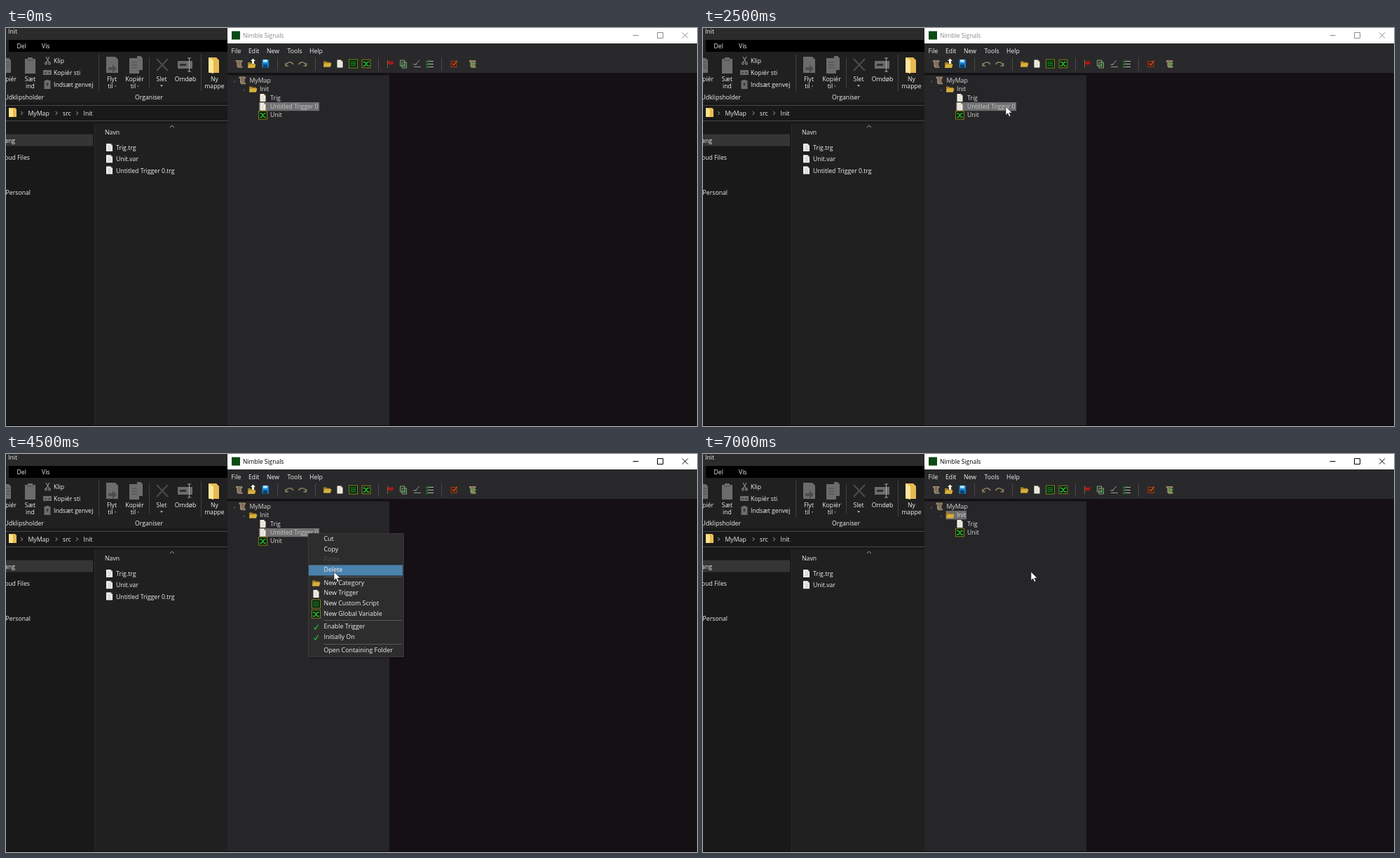
Animation, 986 px wide and 568 px high, one loop 7.2 s. Source, as an HTML page:

```html
<!DOCTYPE html>
<html lang="en">
<head>
<meta charset="utf-8">
<title>Nimble Signals</title>
<style>
html, body { margin: 0; width: 100%; height: 100%; overflow: hidden; background: #141014; }
svg { display: block; width: 100%; height: 100%; }
text { font: 8.7px "Open Sans", "Noto Sans", sans-serif; fill: #f0f0f0; }
.browser text { font-weight: 500; }
.mid text { text-anchor: middle; }
.tree text { fill: #dcdcdc; }
.menu text { font-size: 8.9px; }
.tree .small, .title .small { font-size: 8.5px; }
.title text { fill: currentColor; }
.tree .dim { fill: #c6c6c6; }
.menu .off { fill: #4b4b4d; }
.line { fill: none; stroke: currentColor; }

.title, .gone, .unit, .picked, .menu, .hot, .cursor { animation: 7200ms step-end infinite; }
.title { animation-name: wake; }
.gone { animation-name: remove; }
.unit { animation-name: shift; }
.picked { animation-name: pick; }
.menu { animation-name: popup; }
.cut { animation-name: cut; }
.copy { animation-name: copy; }
.delete { animation-name: delete; }
.cursor { animation-name: move; }

@keyframes wake { 0% { color: #8b8b8b } 37.499% { color: #000 } }
@keyframes remove { 0% { visibility: visible } 69.444% { visibility: hidden } }
@keyframes pick { 0% { visibility: hidden } 69.444% { visibility: visible } }
@keyframes shift { 0% { transform: translateY(12.4px) } 69.444% { transform: none } }
@keyframes popup {
  0% { opacity: 0 } 38.888% { opacity: .6 } 40.277% { opacity: 1 } 68.055%, 100% { opacity: 0 }
}
@keyframes cut { 0%, 47.222% { visibility: hidden } 41.666% { visibility: visible } }
@keyframes copy { 0%, 51.388% { visibility: hidden } 47.222% { visibility: visible } }
@keyframes delete { 0%, 68.055% { visibility: hidden } 54.166% { visibility: visible } }
/* The pointer advances once every 100 ms. */
@keyframes move {
  0% { transform: translate(86px, 580px) }
  5.555% { transform: translate(88px, 566px); animation-timing-function: steps(4) }
  11.111% { transform: translate(99px, 516px); animation-timing-function: steps(3) }
  15.277% { transform: translate(106px, 491px); animation-timing-function: steps(4) }
  20.833% { transform: translate(270px, 325px); animation-timing-function: steps(4) }
  26.388% { transform: translate(404px, 176px); animation-timing-function: steps(4) }
  31.944% { transform: translate(428px, 121px); animation-timing-function: steps(2) }
  34.722% { transform: translate(432px, 112px) }
  40.277% { transform: translate(432px, 112px); animation-timing-function: steps(2) }
  43.055% { transform: translate(446px, 122px) }
  44.444% { transform: translate(446px, 122px); animation-timing-function: steps(3) }
  48.611% { transform: translate(461px, 137px); animation-timing-function: steps(4) }
  54.166% { transform: translate(466px, 159px); animation-timing-function: steps(2) }
  56.944% { transform: translate(467px, 162px) }
  58.333% { transform: translate(467px, 162px); animation-timing-function: steps(3) }
  62.499%, 100% { transform: translate(468px, 168px) }
}
</style>
</head>
<body>
<svg viewBox="0 0 986 568">
  <defs>
    <g id="page">
      <path d="M-4-5.5H1.5L4-3V5.5H-4Z" fill="#f3efe2"/>
      <path d="M1.5-5.5V-3H4Z" fill="#a9a08c"/>
      <path d="M-2-2H1M-2 .5H2M-2 3H2" stroke="#c9c3b2" stroke-width=".7"/>
    </g>
    <g id="file">
      <path d="M-4.5-5.5H2L4.5-3V5.5H-4.5Z" fill="#f4f4f4"/>
      <path d="M2-5.5V-3H4.5Z" fill="#9a9a9a"/>
      <path d="M-2.5-2.5H1M-2.5-.5H3M-2.5 1.5H3M-2.5 3.5H3" stroke="#b5b5b5" stroke-width=".7"/>
    </g>
    <g id="folder">
      <path d="M-5.5-4H-1.5L-.5-2.8H4.5V4H-5.5Z" fill="#a5801f"/>
      <path d="M-5.5 4L-4-1.2H6L4.5 4Z" fill="#d6b040"/>
    </g>
    <g id="script">
      <rect x="-6" y="-6" width="12" height="12" fill="#07200a" stroke="#78851c"/>
      <path d="M-4-2.7H4M-4 0H4M-4 2.7H4" stroke="#25a83a" stroke-width="1.3" stroke-dasharray="2 .8"/>
    </g>
    <g id="var">
      <rect x="-6" y="-5.7" width="12" height="11.4" fill="#061a08" stroke="#8a7d1c"/>
      <path d="M-4.5-2.5H-2L2 3H4.5M-4.5 3H-2L2-2.5H4.5" fill="none" stroke="#2dc043" stroke-width="1.3"/>
    </g>
    <g id="scroll">
      <path d="M-5-5H3.5L5-3.5L3-2V3L5 4.5L4 5.7H-2L-3.5 3.5V-2.5H-5Z" fill="#9d8b72"/>
      <path d="M-2.5-3H2M-2-1H2M-2 1H2M-1 3.5H3" stroke="#4c4033" stroke-width=".8"/>
    </g>
    <path id="check" class="line" d="M-3 .5L-1 3L3-3.5" color="#20b52c" stroke-width="1.4"/>
    <path id="chev" class="line" d="M-1.2-2.4L1.2 0L-1.2 2.4" color="#c8c8c8" stroke-width=".9"/>
    <path id="undo" class="line" d="M-5-1V3H-1M-5 3C-3-3 3-4 6 1" color="#8d8263" stroke-width="1.5"/>
    <path id="caret" d="M-2-1H2L0 1.3Z" fill="#d0d0d0"/>
  </defs>

  <g class="browser">
    <rect width="316" height="568" fill="#202020"/>
    <rect width="316" height="17" fill="#2b2b2b"/>
    <rect x="4" y="17" width="312" height="17" fill="#000"/>
    <rect y="106" width="316" height="30" fill="#191919"/>
    <rect x="-1" y="110.5" width="318" height="22" fill="#191919" stroke="#484848"/>
    <rect y="136" width="126" height="432" fill="#191919"/>
    <path d="M126.5 138V568" stroke="#2c2c2c"/>
    <rect y="151.5" width="124" height="17" fill="#353535"/>
    <path d="M132.5 38V90M204.5 42V85M278.5 38V90" stroke="#414141"/>
    <text x="3" y="8">Init</text>
    <text x="15.5" y="29">Del</text>
    <text x="51" y="29">Vis</text>
    <text x="68" y="49.5">Klip</text>
    <text x="68" y="66.6">Kopiér sti</text>
    <text x="68" y="83.6">Indsæt genvej</text>
    <g text-anchor="end">
      <text x="15" y="76">Kopiér</text>
      <text x="54" y="101.5">Udklipsholder</text>
      <text x="13" y="163.5">Adgang</text>
      <text x="34" y="188">Cloud Files</text>
      <text x="35" y="237.5">Personal</text>
    </g>
    <g class="mid">
      <text x="34.5" y="76">Sæt</text><text x="34.5" y="86">ind</text>
      <text x="151" y="76">Flyt</text><text x="149" y="86">til</text>
      <text x="183.5" y="76">Kopiér</text><text x="181.5" y="86">til</text>
      <text x="222" y="76">Slet</text>
      <text x="256" y="76">Omdøb</text>
      <text x="297.5" y="76">Ny</text><text x="297.5" y="86">mappe</text>
      <text x="204" y="101.5">Organiser</text>
    </g>
    <use href="#caret" x="222" y="82.5"/>
    <use href="#caret" transform="translate(156 83)scale(.6)"/>
    <use href="#caret" transform="translate(188.5 83)scale(.6)"/>
    <g fill="#6c6c6c">
      <path d="M0 43H4L7 46V64H0Z"/>
      <path d="M27 44H31V42H38V44H42V65H27Z"/>
      <path d="M143 41H156L160 45V64H143Z"/>
      <path d="M176 43H187V40H192L195 43V60H190V65H176Z"/>
      <rect x="245" y="47" width="21" height="11"/>
      <rect x="53" y="60" width="12" height="7"/>
      <path d="M54.5 75H57V74H61V75H63.5V87H54.5Z"/>
    </g>
    <g class="line" color="#a8a8a8">
      <path d="M30 46H39M0 49H5M0 53H5M0 57H5" color="#4a4a4a"/>
      <path d="M57 41L61.5 49M62 41L57.5 49"/>
      <circle cx="57" cy="50.5" r="1.5"/><circle cx="62" cy="50.5" r="1.5"/>
      <path d="M259 43H264M261.5 43V62M259 62H264"/>
      <path d="M55 64H58M60 64H63M57 80H61M59 78V83" stroke="#292929"/>
      <path d="M248 52.5H257" stroke="#303030" stroke-width="3"/>
    </g>
    <path d="M146 60H152V64L158 58L152 52V56H146Z" fill="#4d4d4d"/>
    <path d="M179 49H187M179 53H187M179 57H187" stroke="#4d4d4d"/>
    <path d="M215 44L231 61M231 44L215 61" stroke="#4c4c4c" stroke-width="2"/>
    <path d="M289 42H300L304 46V64H289Z" fill="#e7b952"/>
    <path d="M289 42L296 46V65L289 63Z" fill="#ffe79b"/>
    <path d="M4 114H13L15 116V127H4Z" fill="#e7b952"/>
    <path d="M4 114L10 116V127H4Z" fill="#ffe08a"/>
    <use href="#chev" x="22.5" y="121.5"/>
    <use href="#chev" x="72" y="121.5"/>
    <use href="#chev" x="101.5" y="121.5"/>
    <text x="31.5" y="124.6">MyMap</text>
    <text x="81" y="124.6">src</text>
    <text x="110.5" y="124.6">Init</text>
    <path class="line" d="M234 142L237 139L240 142" color="#999"/>
    <text x="141" y="151.5">Navn</text>
    <use href="#file" x="147.5" y="170.5"/><text x="157" y="174">Trig.trg</text>
    <use href="#file" x="147.5" y="186.8"/><text x="157" y="190.2">Unit.var</text>
    <g class="gone">
      <use href="#file" x="147.5" y="203"/><text x="157" y="206.5">Untitled Trigger 0.trg</text>
    </g>
  </g>

  <!-- editor window -->
  <rect x="316" width="670" height="568" fill="#141014"/>
  <rect x="316" y="22" width="670" height="42" fill="#29292b"/>
  <rect x="316" width="670" height="22" fill="#fff"/>
  <rect x="316" y="67.5" width="231" height="501" fill="#262628"/>
  <rect x="322" y="4.5" width="12" height="12" fill="#0b4a15"/>
  <g class="title">
    <text class="small" x="338" y="13.7">Nimble Signals</text>
    <path class="line" d="M894.5 10.5H902.5M929.5 6.5H937.5V14.5H929.5ZM965 6.5L973 14.5M973 6.5L965 14.5"/>
  </g>
  <text x="321.5" y="35.6">File</text>
  <text x="346" y="35.6">Edit</text>
  <text x="372" y="35.6">New</text>
  <text x="401.5" y="35.6">Tools</text>
  <text x="433" y="35.6">Help</text>

  <path d="M387.5 42V61M441.5 42V61M531.5 42V61M621.5 42V61" stroke="#49494b"/>
  <use href="#scroll" x="333" y="51"/>
  <use href="#folder" x="350.5" y="53"/>
  <path d="M351 51V47H349L352.5 43.5L356 47H354V51Z" fill="#f2f2e8"/>
  <rect x="365.5" y="45" width="9.5" height="11.5" fill="#1683d2"/>
  <path d="M367 45H373V49H367Z" fill="#a8dcff"/>
  <path d="M367 52H373V56.5H367Z" fill="#0a416e"/>
  <use href="#undo" x="404" y="51"/>
  <use href="#undo" transform="translate(423.5 51)scale(-1 1)"/>
  <use href="#folder" x="458.5" y="51.5"/>
  <use href="#page" x="476.5" y="51"/>
  <use href="#script" x="495.5" y="51"/>
  <use href="#var" x="514" y="51"/>
  <path d="M544.5 45.5V57" stroke="#76624b"/>
  <path d="M545 47L548.5 48L552.5 47V51.5L548.5 52.5L545 51.5Z" fill="#a81914"/>
  <path d="M562.5 46H569V54H562.5ZM565 49H571.5V57H565Z" fill="#173a1c" stroke="#a5a593" stroke-width=".9"/>
  <path d="M566.5 52H570M566.5 54.5H570" stroke="#35b749"/>
  <path d="M582 55.5H592M584 52.5L590 46M581 52H586" class="line" color="#96968f"/>
  <path d="M603 47.5H610M603 51.5H610M603 55.5H610" stroke="#b9b9a9" stroke-width="1.2"/>
  <path d="M599 47L601 49L603 45.5M599 51L601 53L603 49.5M599 55L601 57L603 53.5" class="line" color="#2dae3d"/>
  <rect x="635" y="47.5" width="8" height="8" fill="#4c190b" stroke="#9c3d1a"/>
  <path class="line" d="M637 50.5L639 53L643.5 46.5" color="#c4662a" stroke-width="1.2"/>
  <use href="#scroll" x="666" y="51"/>
  <path d="M664 51H671M664 54H670" stroke="#55a844" stroke-width="1.3"/>

  <g class="tree">
    <path d="M324 77.5L327 74.5V77.5ZM338 90L341 87V90Z" fill="#505052"/>
    <use href="#scroll" x="337.5" y="74.5"/>
    <text x="347.5" y="77.5">MyMap</text>
    <rect class="picked" x="346.5" y="81" width="29.5" height="12.4" fill="#6c6c6e"/>
    <use href="#folder" x="352.5" y="87.5"/>
    <text x="362" y="90">Init</text>
    <use href="#page" x="366.5" y="99.5"/>
    <text x="377" y="102.5">Trig</text>
    <g class="gone">
      <rect x="361" y="106" width="86" height="12.2" fill="#707072"/>
      <use href="#page" x="366.5" y="112"/>
      <text class="small dim" x="377" y="115">Untitled Trigger 0</text>
    </g>
    <g class="unit">
      <use href="#var" x="366.5" y="112"/>
      <text x="377" y="115">Unit</text>
    </g>
  </g>
  <rect y="567" width="986" height="1" fill="#0b0a0b"/>

  <g class="menu">
    <rect x="433" y="115" width="137" height="177" fill="#000" opacity=".25"/>
    <rect x="431.5" y="113.5" width="136" height="176" fill="#2d2d2e" stroke="#39393a"/>
    <g fill="#4a82ac">
      <rect class="hot cut" x="432" y="114" width="134" height="15"/>
      <rect class="hot copy" x="432" y="129" width="134" height="15"/>
      <rect class="hot delete" x="432" y="158.5" width="134" height="15"/>
    </g>
    <path d="M454 175.5H565M454 237.5H565M454 271.5H565" stroke="#57575a"/>
    <text x="453.5" y="123.7">Cut</text>
    <text x="453.5" y="138.5">Copy</text>
    <text class="off" x="453.5" y="153.2">Paste</text>
    <text x="453.5" y="167.8">Delete</text>
    <use href="#folder" x="442.5" y="184.5"/><text x="453.5" y="186.7">New Category</text>
    <use href="#page" x="442.5" y="199.5"/><text x="453.5" y="201.4">New Trigger</text>
    <use href="#script" x="442.5" y="214"/><text x="453.5" y="216">New Custom Script</text>
    <use href="#var" x="442.5" y="228.5"/><text x="453.5" y="230.7">New Global Variable</text>
    <use href="#check" x="442.5" y="247"/><text x="453.5" y="249.3">Enable Trigger</text>
    <use href="#check" x="442.5" y="262"/><text x="453.5" y="264">Initially On</text>
    <text x="453.5" y="282.6">Open Containing Folder</text>
  </g>

  <path class="cursor" d="M0 0V12.5L2.9 9.8L4.9 14.5L7 13.6L5 9.1H9Z" fill="#fff" stroke="#111" stroke-width=".6"/>
</svg>
</body>
</html>
```
